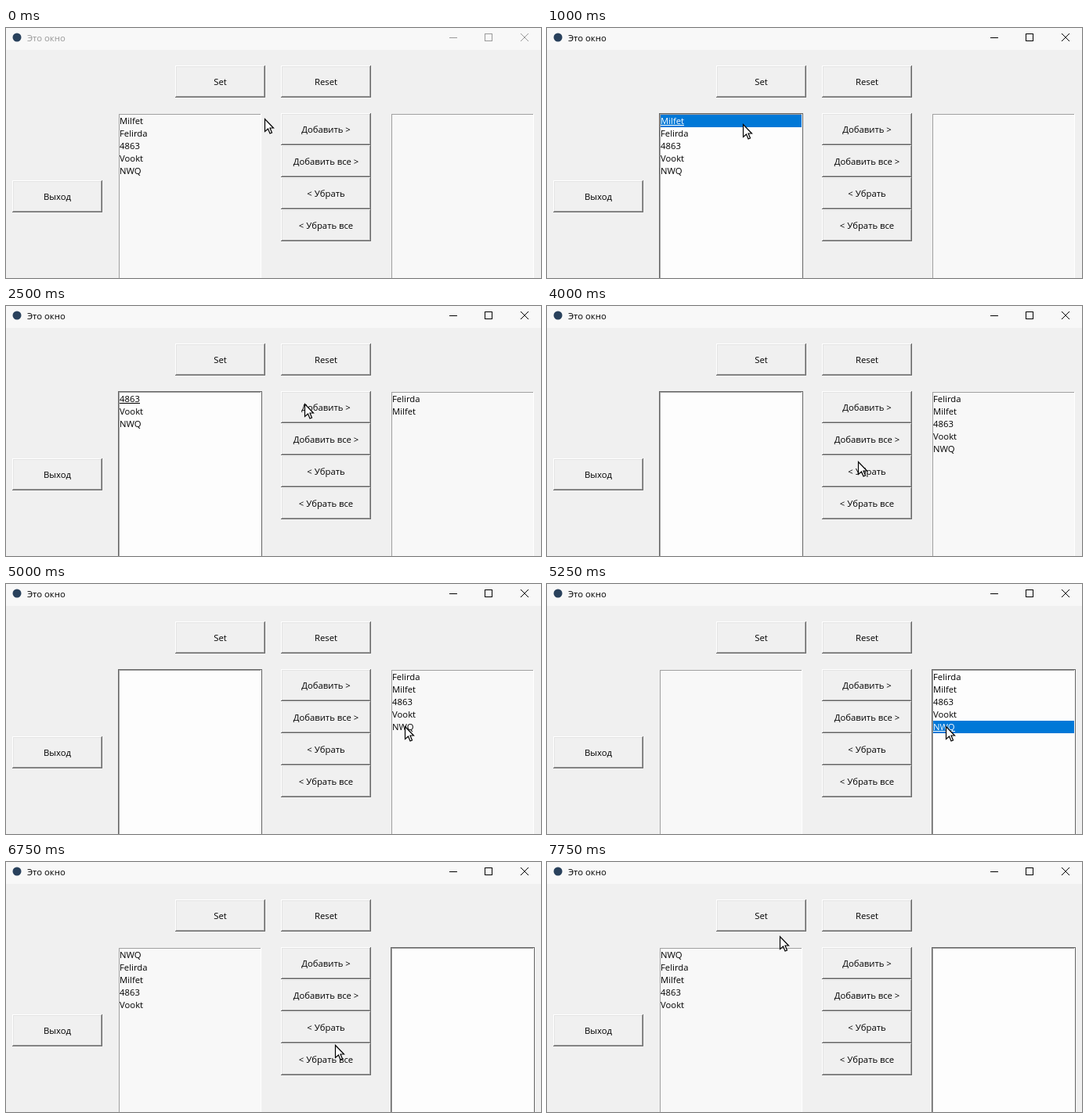
An HTML page with a canvas that plays this animation: 683x320 px, repeating every 8 s.

```html
<!DOCTYPE html>
<html lang="ru">
<head>
<meta charset="utf-8">
<title>Это окно</title>
<style>
html, body { margin: 0; width: 100%; height: 100%; overflow: hidden; background: #f0f0f0; }
canvas { display: block; }
</style>
</head>
<body>
<canvas id="stage" width="683" height="320"></canvas>
<script>
const ctx = document.getElementById('stage').getContext('2d');
const STEP = 250, LOOP = 8000, ROW = 16;

const [A, B, C, D, E] = ['Milfet', 'Felirda', '4863', 'Vookt', 'NWQ'];
const moveButtons = ['Добавить >', 'Добавить все >', '< Убрать', '< Убрать все'];

// Window states; "from" counts steps, "focus" is the list that has the keyboard
const states = [
  { from: 0, left: [A, B, C, D, E], right: [] },
  { from: 4, left: [A, B, C, D, E], right: [], focus: 'left', active: A, selected: [A] },
  { from: 6, left: [A, B, C, D, E], right: [], focus: 'left', active: B, selected: [A, B] },
  { from: 10, left: [C, D, E], right: [B, A], focus: 'left', active: C },
  { from: 15, left: [], right: [B, A, C, D, E], focus: 'left' },
  { from: 21, left: [], right: [B, A, C, D, E], focus: 'right', active: E, selected: [E] },
  { from: 22, left: [E], right: [B, A, C, D], focus: 'right', active: D },
  { from: 25, left: [E, B, A, C, D], right: [], focus: 'right' }
];

// Places the pointer heads for, and the step at which it gets there
const stops = [
  { at: 0, x: 330, y: 116 },
  { at: 6, x: 222, y: 126 },
  { at: 8, x: 340, y: 72 },
  { at: 10, x: 381, y: 125 },
  { at: 11, x: 381, y: 125 },
  { at: 16, x: 397, y: 199 },
  { at: 20, x: 509, y: 182 },
  { at: 21, x: 509, y: 182 },
  { at: 22, x: 438, y: 212 },
  { at: 23, x: 442, y: 243 },
  { at: 26, x: 434, y: 250 },
  { at: 31, x: 297, y: 95 }
];

function pointerAt(step) {
  const i = Math.max(1, stops.findIndex(stop => stop.at >= step));
  const a = stops[i - 1], b = stops[i];
  const t = (step - a.at) / (b.at - a.at);
  const k = t * t * (3 - 2 * t);
  return [Math.round(a.x + (b.x - a.x) * k), Math.round(a.y + (b.y - a.y) * k)];
}

function rect(color, x, y, w, h) {
  ctx.fillStyle = color;
  ctx.fillRect(x, y, w, h);
}

function text(str, x, y, color = '#000', align = 'left') {
  ctx.fillStyle = color;
  ctx.textAlign = align;
  ctx.fillText(str, x, y);
}

// Top and left edges in one colour, bottom and right edges in another
function bevel(x, y, w, h, light, dark) {
  rect(light, x, y, w, 1);
  rect(light, x, y, 1, h);
  rect(dark, x, y + h - 1, w, 1);
  rect(dark, x + w - 1, y, 1, h);
}

function drawTitle(active) {
  const color = active ? '#000' : '#999';
  rect('#f8f8f8', 0, 0, 683, 28);
  ctx.fillStyle = '#29415c';
  ctx.beginPath();
  ctx.arc(14, 12, 5.5, 0, 7);
  ctx.fill();
  text('Это окно', 27, 17, color);
  rect(color, 566, 12, 10, 1);
  ctx.strokeStyle = color;
  ctx.lineWidth = 1;
  ctx.strokeRect(611.5, 7.5, 9, 9);
  ctx.stroke(new Path2D('M657 7l10 10m0-10l-10 10'));
}

function drawButton(label, x, y) {
  bevel(x, y, 115, 41, '#fff', '#696969');
  bevel(x + 1, y + 1, 113, 39, '#e3e3e3', '#a0a0a0');
  text(label, x + 57.5, y + 25, '#000', 'center');
}

function drawList(x, items, focused, { active, selected = [] }) {
  const y = 109;
  rect(focused ? '#646464' : '#f0f0f0', x, y, 184, 240);
  rect(focused ? '#fdfdfd' : '#f8f8f8', x + 1, y + 1, 182, 238);
  bevel(x + 1, y + 1, 182, 238, '#a0a0a0', '#fff');
  items.forEach((item, i) => {
    const top = y + 2 + ROW * i;
    const on = focused && selected.includes(item);
    const color = on ? '#fff' : '#000';
    if (on) rect('#0078d7', x + 2, top, 180, ROW);
    text(item, x + 2, top + 12, color);
    if (focused && item === active) rect(color, x + 2, top + 13, Math.round(ctx.measureText(item).width), 1);
  });
}

const arrow = new Path2D('M0 0V16L4 12.5L6.5 18.5L9 17.5L6.5 11.5H11Z');

function drawPointer([x, y]) {
  ctx.save();
  ctx.translate(x + 0.5, y + 0.5);
  ctx.fillStyle = '#fff';
  ctx.strokeStyle = '#000';
  ctx.lineWidth = 1.2;
  ctx.fill(arrow);
  ctx.stroke(arrow);
  ctx.restore();
}

function draw(now) {
  const step = Math.floor(now % LOOP / STEP);
  const s = states.findLast(state => state.from <= step);
  ctx.font = '11.3px "Open Sans", "Noto Sans", sans-serif';
  rect('#f0f0f0', 0, 0, 683, 320);
  drawTitle(Boolean(s.focus));
  drawButton('Set', 216, 48);
  drawButton('Reset', 351, 48);
  drawButton('Выход', 8, 195);
  moveButtons.forEach((label, i) => drawButton(label, 351, 109 + 41 * i));
  drawList(143, s.left, s.focus === 'left', s);
  drawList(491, s.right, s.focus === 'right', s);
  drawPointer(pointerAt(step));
}

const start = performance.now();
function tick() {
  draw(performance.now() - start);
  requestAnimationFrame(tick);
}
tick();
</script>
</body>
</html>
```
